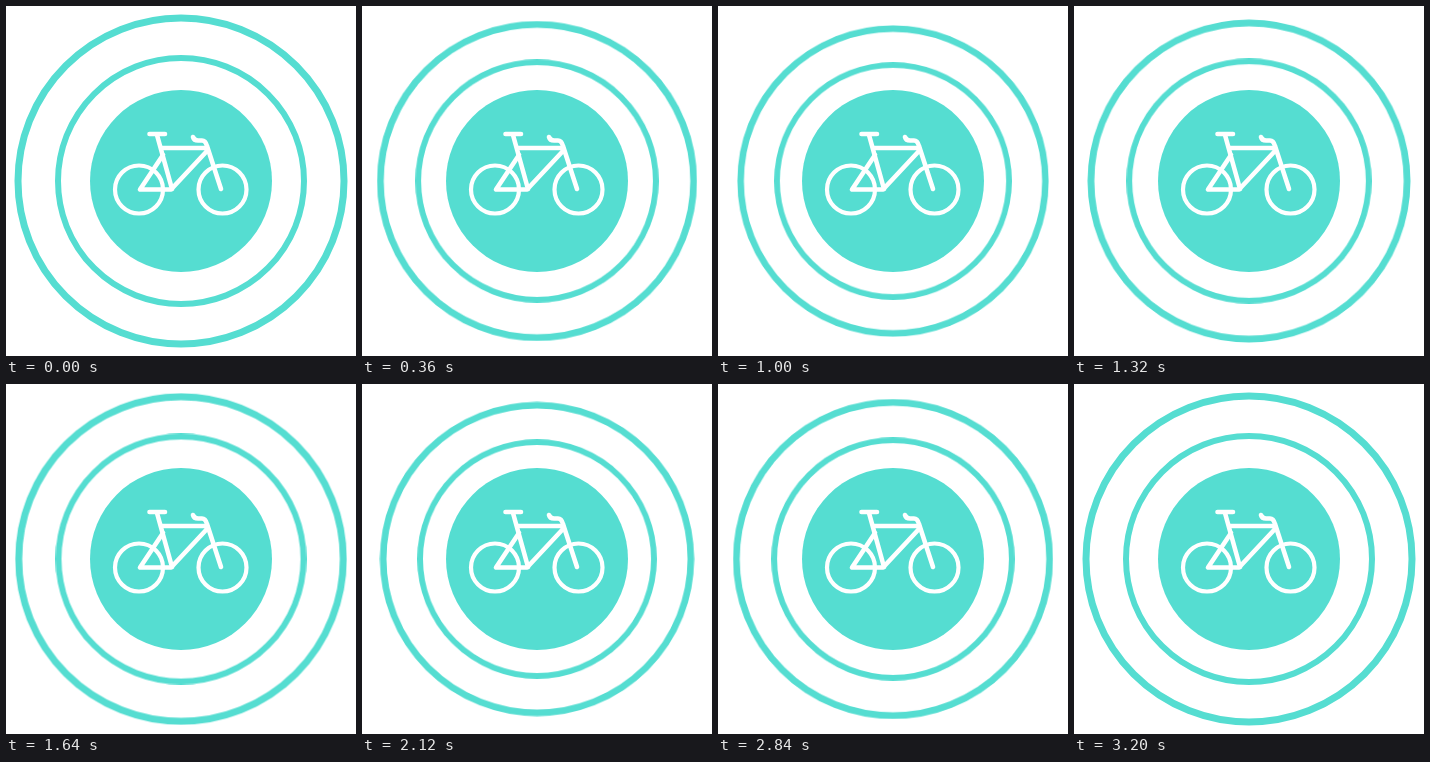
An HTML page that plays this animation: 350x350 px, repeating every 3.24 s.

```html
<!DOCTYPE html>
<html lang="en">
<head>
<meta charset="utf-8">
<title>Bike pulse</title>
<style>
  html, body { margin: 0; width: 100%; height: 100%; overflow: hidden; background: #fff; }
  svg { display: block; width: 100vw; height: 100vh; }
  .ring {
    fill: none;
    stroke: #55ddd1;
    transform-origin: 175px 175px;
    animation: pulse 3240ms steps(20, end) infinite;
  }
  .outer { --small: .9133; stroke-width: 7; }
  .inner { --small: .924; stroke-width: 6; }
  .disc { fill: #55ddd1; }
  .bike {
    fill: none;
    stroke: #fff;
    stroke-width: 4.6;
    stroke-linecap: round;
    stroke-linejoin: round;
    filter: blur(.4px);
  }
  /* two 1600 ms pulses, then one 40 ms hold */
  @keyframes pulse {
    0%, 49.3827%, 98.7654%, 100% { transform: scale(1); }
    24.6914%, 74.0741% { transform: scale(var(--small)); }
  }
</style>
</head>
<body>
<svg viewBox="0 0 350 350">
  <circle class="ring outer" cx="175" cy="175" r="163"/>
  <circle class="ring inner" cx="175" cy="175" r="123"/>
  <circle class="disc" cx="175" cy="175" r="91"/>
  <g class="bike">
    <g stroke-width="4.2">
      <circle cx="133" cy="183.5" r="24"/>
      <circle cx="216.5" cy="183.5" r="24"/>
    </g>
    <!-- saddle and seat tube -->
    <path d="M143.5 128H159M151 129L166 183"/>
    <!-- stays, down tube and top tube -->
    <path d="M157 149L134 183.5H165L201 145M156 142H199"/>
    <!-- handlebar and fork -->
    <path d="M187 131Q188 134.5 192 134.5H196Q199.500 134.5 201 140L215 183"/>
  </g>
</svg>
</body>
</html>
```
